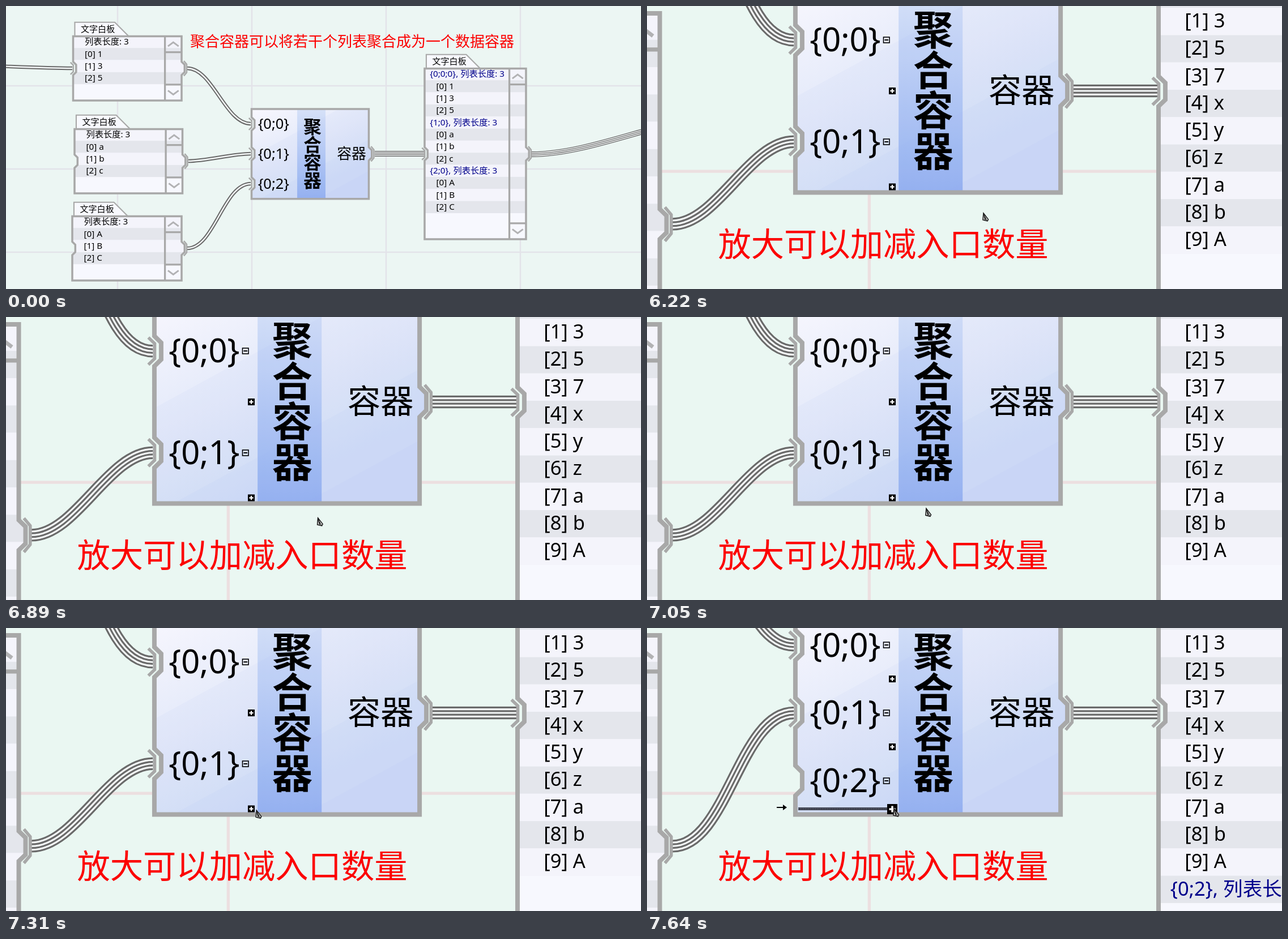
These frames come from a looping animation (1121 px wide and 500 px high, 8000 ms). An HTML page with a canvas:

```html
<!DOCTYPE html>
<html lang="zh-CN">
<head>
<meta charset="utf-8">
<style>
html, body { margin: 0; width: 100%; height: 100%; overflow: hidden; background: #ebf6f3; }
canvas { display: block; }
</style>
</head>
<body>
<canvas id="stage" width="1121" height="500"></canvas>
<script>
const c = document.getElementById('stage').getContext('2d');
const FONT = '"Noto Sans", "Noto Sans CJK SC", sans-serif';
const GRAY = '#a8a8a8', RED = '#fc0000', MARK = '#ec0000', NAVY = '#00008b';
const ROW = 18.15;
let u = 1; // size of one board unit in drawing units

function text(s, x, y, size, color = '#000', weight = 400, align = 'left') {
  c.font = `${weight} ${size}px ${FONT}`;
  c.textAlign = align;
  c.fillStyle = color;
  c.fillText(s, x, y + size * 0.35);
}

function line(points, width, color) {
  c.beginPath();
  points.forEach(([x, y]) => c.lineTo(x, y));
  c.lineWidth = width;
  c.strokeStyle = color;
  c.stroke();
}

function grid(x0, y0, dx, dy, bg, color) {
  c.fillStyle = bg;
  c.fillRect(0, 0, 1121, 500);
  for (let x = x0; x < 1121; x += dx) line([[x, 0], [x, 500]], 2 * u, color);
  for (let y = y0; y < 500; y += dy) line([[0, y], [1121, y]], 2 * u, color);
}

function notch(path, x, y, dir) {
  for (const [a, b] of [[0, -10], [4.5, -5.6], [4.5, 5.6], [0, 10]])
    path.lineTo(x + a * u, y + b * dir * u);
}

function outline(x, y, w, h, ins, outs) {
  const p = new Path2D();
  p.moveTo(x, y);
  p.lineTo(x + w, y);
  outs.forEach(v => notch(p, x + w, v, 1));
  p.lineTo(x + w, y + h);
  p.lineTo(x, y + h);
  [...ins].reverse().forEach(v => notch(p, x, v, -1));
  p.closePath();
  return p;
}

function edge(path) {
  c.lineWidth = 3 * u;
  c.strokeStyle = GRAY;
  c.stroke(path);
}

function plug(x, y, off, k) {
  line([[0, -9], [4.2, -5], [4.2, 5], [0, 9]]
    .map(([a, b]) => [x + (a + off) * u, y + b * k * u]), 2.1 * u, GRAY);
}
const plugIn = (x, y) => plug(x, y, -4, 1);
const plugOut = (x, y) => plug(x, y, 3.4, 1.25);

function wire(x1, y1, x2, y2, multi) {
  const pull = Math.hypot(x2 - x1, y2 - y1) * 0.3;
  const widths = multi ? [8.4, 6, 3.6, 1.2] : [5.4, 2];
  widths.forEach((w, i) => {
    c.beginPath();
    c.moveTo(x1, y1);
    c.bezierCurveTo(x1 + pull, y1, x2 - pull, y2, x2, y2);
    c.lineWidth = w * u;
    c.strokeStyle = i % 2 ? '#f4f7f7' : '#6a6a6a';
    c.stroke();
  });
}

const list = (head, items) => [head, ...[...items].map((v, i) => `[${i}] ${v}`)];
const tree = (path, items) => list(`{${path}}, 列表长度: ${items.length}`, items);

function panel(x, y, right, bottom, rows, hasIn, hasOut) {
  const w = right - x, h = bottom - y, mid = y + h / 2, rh = ROW * u;
  const tx = x + 2.5 * u, ty = y - 21 * u;
  c.beginPath();
  [[tx, y], [tx, ty], [tx + 60 * u, ty], [tx + 81 * u, y]].forEach(p => c.lineTo(...p));
  c.fillStyle = '#f8f9fe';
  c.fill();
  c.lineWidth = 1.8 * u;
  c.strokeStyle = GRAY;
  c.stroke();
  text('文字白板', x + 11.5 * u, y - 11 * u, 12.8 * u);

  const path = outline(x, y, w, h, [mid], [mid]);
  c.save();
  c.clip(path);
  c.fillStyle = '#f7f8fe';
  c.fillRect(x - 9, y, w + 20, h);
  rows.forEach((s, i) => {
    const top = y - 0.6 * u + i * rh, head = s[0] === '{';
    c.fillStyle = i % 2 ? '#e4e6ec' : '#f4f4fb';
    c.fillRect(x - 9, top, w + 20, rh);
    text(s, x + (head ? 7.8 : 17.4) * u, top + rh / 2 - 0.5 * u, 13 * u, head ? NAVY : '#000');
  });
  const sx = right - 25 * u, cx = right - 12.5 * u;
  line([[sx, y], [sx, bottom]], 2.8 * u, GRAY);
  for (const [from, d] of [[y, 1], [bottom, -1]]) {
    const ly = from + 24 * u * d, cy = from + 12 * u * d, k = 3 * u * d;
    line([[sx, ly], [right, ly]], 2.8 * u, GRAY);
    line([[cx - 8 * u, cy + k], [cx, cy - k], [cx + 8 * u, cy + k]], 2.6 * u, '#b2b2b4');
  }
  c.restore();
  edge(path);
  if (hasIn) plugIn(x, mid);
  if (hasOut) plugOut(right, mid);
}

const ports = (mid, n) => Array.from({ length: n }, (_, i) => mid + (i - (n - 1) / 2) * 135 / n * u);

function node(x, mid, n, linked) {
  const w = 176 * u, h = 135 * u, y = mid - h / 2, ins = ports(mid, n);
  const path = outline(x, y, w, h, ins, [mid]);
  c.save();
  c.clip(path);
  const g = c.createLinearGradient(x, y, x + w * 0.35, y + h);
  g.addColorStop(0, '#f8f7fe');
  g.addColorStop(1, '#d2def6');
  c.fillStyle = g;
  c.fillRect(x, y, w + 9 * u, h);
  const band = c.createLinearGradient(0, y, 0, y + h);
  band.addColorStop(0, '#d6e1f8');
  band.addColorStop(1, '#94b2f0');
  c.fillStyle = band;
  c.fillRect(x + 68.5 * u, y, 42.5 * u, h);
  // diagonal sheen
  c.fillStyle = 'rgba(140,170,230,.055)';
  for (const k of [0.53, 1.05, 1.4]) {
    c.beginPath();
    c.moveTo(x, y + h * k);
    c.lineTo(x + w * 1.1, y + h * k - w * 0.6);
    c.lineTo(x + w * 1.1, y + h * 2);
    c.lineTo(x, y + h * 2);
    c.fill();
  }
  c.restore();
  edge(path);
  ins.forEach((v, i) => {
    if (i < linked) plugIn(x, v);
    text(`{0;${i}}`, x + 9.5 * u, v, 21.7 * u);
  });
  plugOut(x + w, mid);
  text('容器', x + w - 4 * u, mid - 0.3 * u, 21.9 * u, '#000', 400, 'right');
  [...'聚合容器'].forEach((s, i) =>
    text(s, x + 91.5 * u, mid + (i - 1.5) * 26.9 * u + 0.2 * u, 26.8 * u, '#000', 900, 'center'));
}

function overview() {
  u = 1.176;
  grid(197, 141, 237, 147, '#ecf6f3', '#e3e3e9');
  wire(-100, 104, 117, 110);
  [[310, 110, 208], [311.5, 274, 261], [310, 428, 314]].forEach(([x, a, b]) => wire(x + 10, a, 432, b));
  wire(651, 261, 738, 261, true);
  wire(928, 262, 1290, 190, true);
  panel(118.5, 53.5, 310, 167, list('列表长度: 3', '135'), true, true);
  panel(121, 217.5, 311.5, 331, list('列表长度: 3', 'abc'), false, true);
  panel(117, 371.5, 310, 485, list('列表长度: 3', 'ABC'), false, true);
  node(433.5, 261.3, 3, 3);
  panel(739, 110.5, 918, 412,
    [...tree('0;0;0', '135'), ...tree('1;0', 'abc'), ...tree('2;0', 'ABC')], true, true);
  text('聚合容器可以将若干个列表聚合成为一个数据容器', 325, 63, 26, RED);
}

function board(n, bg, gridColor) {
  const ins = ports(245, n), tail = [...tree('2;0', 'ab'), ...tree('3;0', 'A')];
  grid(78.3, 48.4, 201.6, 125, bg, gridColor);
  wire(-150, -27, 151, 104, true);
  wire(-150, 354, 151, 333.5, true);
  wire(351, 104, 431.5, ins[0], true);
  wire(351, 333.5, 431.5, ins[1], true);
  wire(617, 245, 673, 245, true);
  panel(151, 38, 342.5, 170, tail, true, true);
  panel(151, 193.5, 342.5, 473.5, [...tree('0;0', '1357'), ...tree('1;0', 'xyz'), ...tail], true, true);
  node(432.5, 245, n, 2);
  const rows = [...tree('0;0', 'abA'), ...tree('0;1', '1357xyzabA')];
  if (n > 2) rows.push(...tree('0;2', ''));
  panel(673.5, 81.5, 931, 409, rows, true, false);
}

function arrow(x1, y1, x2, y2) {
  const a = Math.atan2(y2 - y1, x2 - x1);
  const back = d => [x2 - 19 * Math.cos(a + d), y2 - 19 * Math.sin(a + d)];
  line([[x1, y1], [x2, y2]], 4, MARK);
  line([back(0.42), [x2, y2], back(-0.42)], 4, MARK);
}

function flatten() {
  u = 1;
  board(2, '#ecf6f3', '#e3e5e9');
  c.strokeStyle = MARK;
  c.lineWidth = 4;
  [[150, 39, 194, 106], [150, 195, 192, 256], [672, 81, 124, 72], [672, 153, 125, 204]]
    .forEach(r => c.strokeRect(...r));
  arrow(354, 89, 667, 121);
  arrow(345, 360, 667, 336);
  for (const [x, y] of [[466, 81.5], [470, 366.5]]) {
    text('扁平化', x + 1, y + 1, 21, '#000', 500);
    text('扁平化', x, y, 21, RED, 500);
  }
  text('当输入的是容器时, 会先将容器扁平化为列表再聚合成为一个新的数据容器', 351, 439, 22.1, RED);
  line([[877.5, 475], [877.5, 499]], 1.3, '#000');
}

function plus(x, y, r) {
  c.fillStyle = '#000';
  c.fillRect(x - r, y - r, 2 * r, 2 * r);
  const k = r * 0.62;
  line([[x - k, y], [x + k, y]], r * 0.38, '#fff');
  line([[x, y - k], [x, y + k]], r * 0.38, '#fff');
}

function minus(x, y) {
  c.lineWidth = 1.6;
  c.strokeStyle = '#000';
  c.strokeRect(x - 5, y - 5, 10.5, 10);
  line([[x - 3, y], [x + 3.5, y]], 2, '#000');
}

const track = [[6680, 597, 374], [6890, 554, 363], [7170, 453, 334], [7250, 453, 334], [7360, 439, 327]];

function pointerAt(t) {
  if (t <= track[0][0]) return track[0].slice(1);
  const i = track.findIndex(k => k[0] > t);
  if (i < 0) return track[track.length - 1].slice(1);
  const [t0, x0, y0] = track[i - 1], [t1, x1, y1] = track[i];
  let f = (t - t0) / (t1 - t0);
  if (i === 1) f **= 1.5;
  return [x0 + (x1 - x0) * f, y0 + (y1 - y0) * f];
}

function pointer(x, y) {
  c.beginPath();
  [[-3, -8], [5.5, 3], [4, 6], [-4, 4]].forEach(([a, b]) => c.lineTo(x + a, y + b));
  c.closePath();
  c.fillStyle = '#f4f6f4';
  c.fill();
  c.lineWidth = 1.5;
  c.strokeStyle = '#111';
  c.stroke();
  line([[x - 2, y - 6], [x, y + 4]], 2, '#222');
  line([[x, y - 1], [x + 3, y + 5]], 1.2, '#222');
}

function zoomed(t) {
  const n = t < 7640 ? 2 : 3, step = 360 / n;
  u = 1;
  c.setTransform(2.66, 0, 0, 2.66, -888.5, -501.7);
  board(n, '#eaf7f2', '#ecdfe0');
  c.setTransform(1, 0, 0, 1, 0, 0);
  for (let i = 0; i < n; i++) {
    const y = 150 + (i - (n - 1) / 2) * step;
    minus(422.5, y);
    if (i < n - 1) plus(433, y + step / 2, 6);
  }
  if (t >= 7360) {
    line([[267, 319.5], [442, 319.5]], 5, '#3c3f4c');
    c.setLineDash([1, 2]);
    line([[267, 319.5], [426, 319.5]], 2, '#6a7080');
    c.setLineDash([]);
    plus(433, 320, 9);
    line([[229, 317], [244, 317]], 2, '#000');
    c.fillStyle = '#000';
    c.beginPath();
    [[240, 312], [247, 317], [240, 322]].forEach(p => c.lineTo(...p));
    c.fill();
  } else plus(433, 319.5, 6);
  text('放大可以加减入口数量', 125.5, 422, 58.3, RED);
  pointer(...pointerAt(t));
}

function frame(now) {
  const t = now % 8000;
  if (t < 500) overview();
  else if (t < 6220) flatten();
  else zoomed(t);
  requestAnimationFrame(frame);
}
requestAnimationFrame(frame);
</script>
</body>
</html>
```
